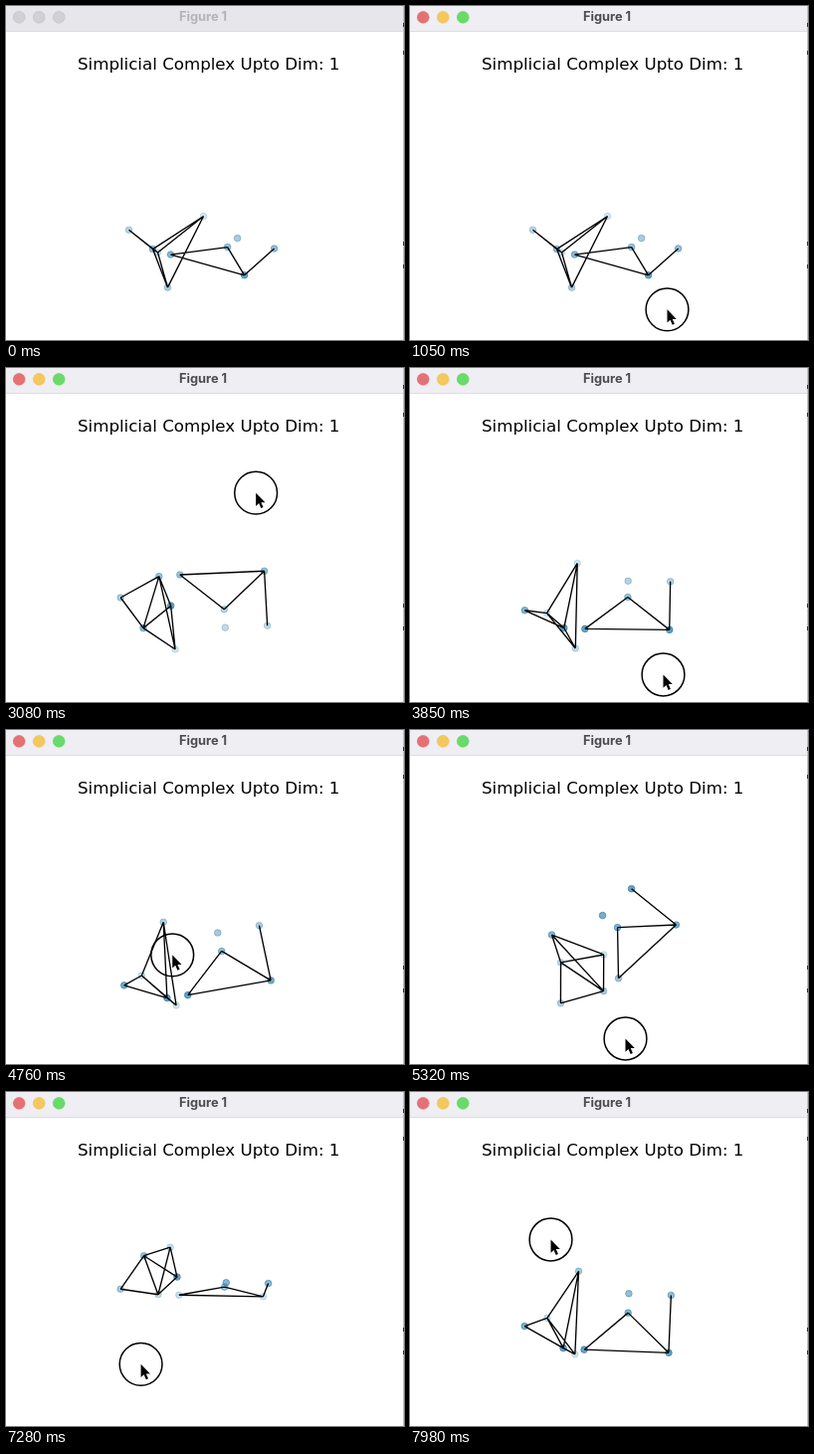
An HTML page with a canvas for the animation above (8 s loop, 400x336 px).

```html
<!DOCTYPE html>
<html>
<head>
<meta charset="utf-8">
<style>
  html, body { margin: 0; width: 100%; height: 100%; overflow: hidden; background: #fff; }
  canvas { display: block; width: 400px; height: 336px; }
</style>
</head>
<body>
<canvas id="stage" width="400" height="336"></canvas>
<script>
const ctx = document.getElementById('stage').getContext('2d');
const LOOP = 8000, STEP = 70;
const CENTER = { x: 209.9, y: 222.9 };

// Ground-plane positions; two vertices lie off the shared plane.
const PLANE = 25.3;
const vertices = [
  [-86.4, -39], [-57.4, -46, 55.6], [-11.4, -66.6], [-62.4, -0.5], [-47.4, -4, 71.9],
  [-44.4, 10.5], [12.7, -4.5], [29.7, 52], [59.7, -1.6], [22.7, -22.4]
];
const edges = ['01', '03', '13', '12', '14', '23', '34', '24', '56', '57', '67', '78'];

// The pointer's stops and the view (degrees) that each drag leads to.
const start = { azimuth: 0, elevation: 30 };
const stops = [
  { t: 250, x: 120, y: 345, ...start },
  { t: 490, x: 147, y: 243 },
  { t: 980, x: 258, y: 305 },
  { t: 1400, x: 258, y: 303 },
  { t: 1720, x: 193, y: 254 },
  { t: 2380, x: 310, y: 291, azimuth: 65.5, elevation: 56 },
  { t: 3200, x: 247, y: 115, azimuth: 24, elevation: -71 },
  { t: 3850, x: 254, y: 308, azimuth: 28.4, elevation: 52.2 },
  { t: 4060, x: 261, y: 312, azimuth: 36, elevation: 60 },
  { t: 4620, x: 161, y: 216 },
  { t: 5320, x: 216, y: 310, azimuth: 76.2, elevation: 120 },
  { t: 6020, x: 128, y: 276, azimuth: 19.5, elevation: 102 },
  { t: 6300, x: 128, y: 233 },
  { t: 6580, x: 128, y: 182 },
  { t: 7050, x: 134, y: 296, azimuth: 24, elevation: 185 },
  { t: 7980, x: 141, y: 148, azimuth: 27, elevation: 70.5 }
];
stops.forEach((stop, i) => { stops[i] = { ...stops[i - 1], ...stop }; });
const presses = [[980, 1190], [1680, 4200], [4550, 6200], [6510, LOOP]];

// Ease from one stop to the next.
function stateAt(t) {
  const i = stops.findIndex(stop => stop.t > t);
  if (i < 0) return stops[stops.length - 1];
  if (i === 0) return stops[0];
  const from = stops[i - 1], to = stops[i];
  const u = (t - from.t) / (to.t - from.t), ease = u * u * (3 - 2 * u);
  const at = key => from[key] + (to[key] - from[key]) * ease;
  return { x: at('x'), y: at('y'), azimuth: at('azimuth'), elevation: at('elevation') };
}

function mix(from, to, k) {
  return `rgb(${from.map((v, i) => Math.round(v + (to[i] - v) * k))})`;
}

function disc(x, y, r) {
  ctx.beginPath();
  ctx.arc(x, y, r, 0, 2 * Math.PI);
}

function label(text, x, y, font, color) {
  ctx.font = font;
  ctx.fillStyle = color;
  ctx.fillText(text, x, y);
}

function drawWindow(active) {
  ctx.fillStyle = '#fff';
  ctx.fillRect(0, 0, 400, 336);
  ctx.fillStyle = mix([231, 230, 235], [239, 238, 243], active);
  ctx.fillRect(0, 0, 400, 25);
  ctx.fillStyle = '#dddce0';
  ctx.fillRect(0, 25, 400, 1);
  [[229, 113, 116], [245, 200, 92], [104, 219, 104]].forEach((color, i) => {
    disc(13.2 + 20 * i, 11.3, 5.9);
    ctx.fillStyle = mix([209, 208, 211], color, active);
    ctx.fill();
    ctx.lineWidth = 0.6;
    ctx.strokeStyle = mix([190, 189, 192], color.map(v => v * 0.95), active);
    ctx.stroke();
  });
  ctx.textAlign = 'center';
  label('Figure 1', 198, 15.3, '700 12.8px Inter, sans-serif',
    mix([180, 179, 182], [76, 75, 78], active));
  label('Simplicial Complex Upto Dim: 1', 203.7, 64,
    '16.67px "DejaVu Sans", sans-serif', '#000');

  ctx.fillStyle = '#c4c4c6';
  ctx.fillRect(399, 0, 1, 336);
  ctx.fillStyle = '#333';
  for (const y of [17, 45, 237, 260]) ctx.fillRect(399, y, 1, 4);
}

function project({ azimuth, elevation }) {
  const az = azimuth * Math.PI / 180, el = elevation * Math.PI / 180;
  const [ca, sa, ce, se] = [Math.cos(az), Math.sin(az), Math.cos(el), Math.sin(el)];
  return vertices.map(([a, b, z = PLANE]) => {
    const depth = b * ca - a * sa;
    return {
      x: CENTER.x + a * ca + b * sa,
      y: CENTER.y + depth * se + z * ce,
      near: depth * ce - z * se
    };
  });
}

// Nearer vertices are more opaque.
function drawComplex(view) {
  const points = project(view);
  const nears = points.map(p => p.near);
  const min = Math.min(...nears), range = Math.max(...nears) - min;
  ctx.lineWidth = 1;
  for (const p of points) {
    const alpha = 0.2 + 0.5 * (p.near - min) / range;
    disc(p.x, p.y, 3.3);
    ctx.fillStyle = ctx.strokeStyle = `rgba(38, 122, 165, ${alpha})`;
    ctx.fill();
    ctx.stroke();
  }
  ctx.lineWidth = 1.35;
  ctx.strokeStyle = '#000';
  ctx.beginPath();
  for (const [i, j] of edges) {
    ctx.moveTo(points[i].x, points[i].y);
    ctx.lineTo(points[j].x, points[j].y);
  }
  ctx.stroke();
}

function drawPointer({ x, y }, pressed) {
  ctx.save();
  ctx.translate(x + 0.5, y + 0.5);
  if (pressed) {
    disc(0, 0, 21.4);
    ctx.lineWidth = 1.5;
    ctx.strokeStyle = '#000';
    ctx.stroke();
  }
  const arrow = new Path2D('M0 0V13.2L3 10.4L5.2 15.4L7.4 14.4L5.2 9.6H9.3Z');
  ctx.lineWidth = 1.6;
  ctx.strokeStyle = '#fff';
  ctx.stroke(arrow);
  ctx.fillStyle = '#000';
  ctx.fill(arrow);
  ctx.restore();
}

function frame() {
  const t = Math.floor(performance.now() % LOOP / STEP) * STEP;
  const state = stateAt(t);
  drawWindow(Math.min(1, t / 350));
  drawComplex(state);
  drawPointer(state, presses.some(([from, to]) => t >= from && t < to));
  requestAnimationFrame(frame);
}
frame();
</script>
</body>
</html>
```
